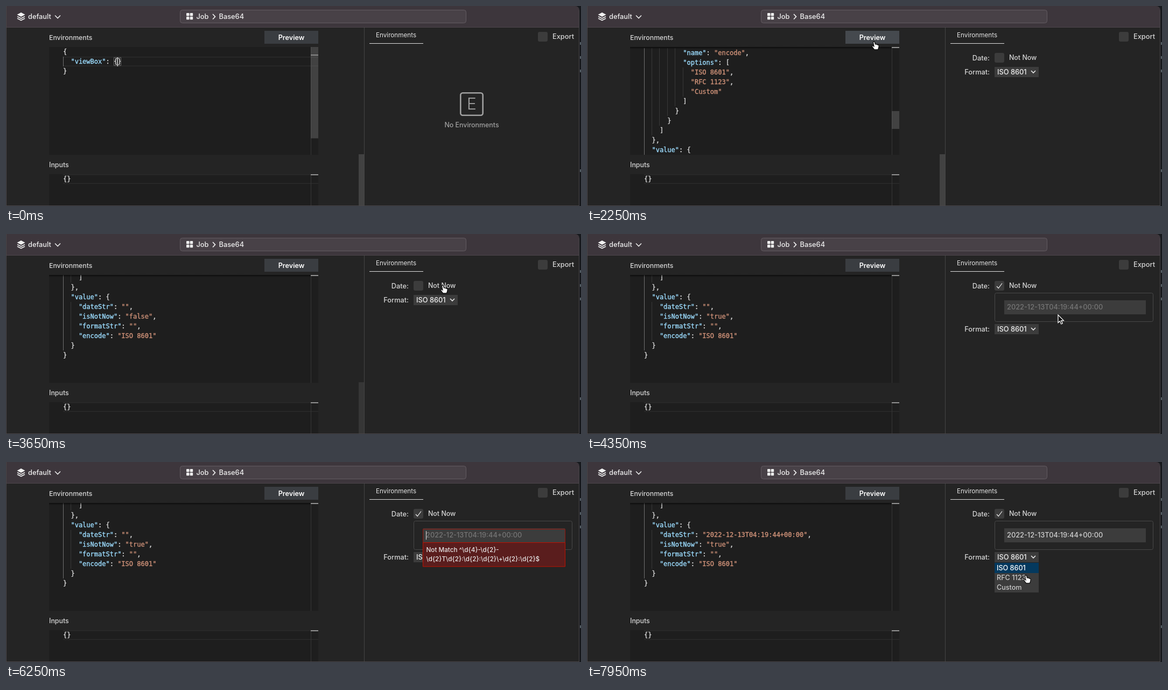
Write an HTML page with a canvas that moves like this. It is 1068 px wide and 371 px high and loops after 8 s.

```html
<!DOCTYPE html>
<html lang="en">
<head>
<meta charset="utf-8">
<title>Environment editor</title>
<style>
html, body { margin: 0; width: 100%; height: 100%; overflow: hidden; background: #242424 }
canvas { display: block }
</style>
</head>
<body>
<canvas id="stage" width="1068" height="371"></canvas>
<script>
const ctx = document.getElementById('stage').getContext('2d');
const LOOP = 8000, LINE = 18, CHAR = 7.224, TOP = 76, LEFT = 106;
const DATE = '2022-12-13T04:19:44+00:00';
const FORMATS = ['ISO 8601', 'RFC 1123', 'Custom'];
const FIRST_LINE = 40, LINE_COUNT = 57;
const PLAIN = '#dcdcdc', BRACKETS = ['#ffd700', '#da70d6', '#179fff'];

const during = (t, from, to) => t >= from && t < to;

// Eased interpolation through keys of the form [time, ...values].
function follow(keys, t) {
  const next = keys.findIndex(k => k[0] > t);
  if (next === 0) return keys[0].slice(1);
  if (next < 0) return keys[keys.length - 1].slice(1);
  const a = keys[next - 1], b = keys[next];
  const u = (t - a[0]) / (b[0] - a[0]), e = u * u * (3 - 2 * u);
  return a.slice(1).map((v, i) => v + (b[i + 1] - v) * e);
}

function rect(x, y, w, h, fill) {
  ctx.fillStyle = fill;
  ctx.fillRect(x, y, w, h);
}

function box(x, y, w, h, radius, fill, stroke, width = 1) {
  ctx.beginPath();
  ctx.roundRect(x, y, w, h, radius);
  if (fill) { ctx.fillStyle = fill; ctx.fill(); }
  if (stroke) { ctx.strokeStyle = stroke; ctx.lineWidth = width; ctx.stroke(); }
}

function line(points, color, width) {
  ctx.beginPath();
  points.forEach(([x, y]) => ctx.lineTo(x, y));
  ctx.strokeStyle = color;
  ctx.lineWidth = width;
  ctx.stroke();
}

function label(text, x, y, { size = 12.8, color = '#d6d6d6', weight = 500, align = 'left' } = {}) {
  ctx.font = `${weight} ${size}px Inter, sans-serif`;
  ctx.textAlign = align;
  ctx.textBaseline = 'middle';
  ctx.fillStyle = color;
  ctx.fillText(text, x, y);
}

function chevron(x, y, size, color = '#e8e8e8') {
  line([[x - size, y - size / 2], [x, y + size / 2], [x + size, y - size / 2]], color, 1.6);
}

function drawCode(text, y, bracketMode) {
  const indent = text.search(/\S/);
  ctx.font = '12px "DejaVu Sans Mono", monospace';
  ctx.textAlign = 'left';
  ctx.textBaseline = 'alphabetic';
  ctx.lineWidth = .35;
  for (const m of text.matchAll(/("[^"]*")(?=:)|"[^"]*"|[{}[\]]+|[^"{}[\]]+/g)) {
    const token = m[0];
    let color = PLAIN;
    if (bracketMode) {
      if (/^[{}[\]]/.test(token)) color = BRACKETS[indent / 2 % 3];
    } else if (m[1]) color = '#9cdcfe';
    else if (token[0] === '"') color = '#ce9178';
    ctx.fillStyle = ctx.strokeStyle = color;
    ctx.fillText(token, LEFT + m.index * CHAR, y + 13);
    ctx.strokeText(token, LEFT + m.index * CHAR, y + 13);
  }
}

function codeLines(t) {
  const date = t < 4900 ? '' : t < 5850 ? '2' : t < 6800 ? '' : DATE;
  return [
    '          "name": "encode",',
    '          "options": [',
    ...FORMATS.map((f, i) => `            "${f}"${i < 2 ? ',' : ''}`),
    '          ]', '        }', '      }', '    ]', '  },',
    '  "value": {',
    `    "dateStr": "${date}",`,
    `    "isNotNow": "${t >= 3950}",`,
    '    "formatStr": "",',
    '    "encode": "ISO 8601"',
    '  }', '}'
  ];
}

function currentLine(y) {
  rect(LEFT, y, 474, 1.5, '#2b2b2b');
  rect(LEFT, y + 16.5, 474, 1.5, '#2b2b2b');
}

function drawEditor(t, bracketMode) {
  const pasted = t >= 350;
  rect(80, TOP, 500, 200, '#1e1e1e');
  ctx.save();
  ctx.beginPath();
  ctx.rect(80, TOP, 500, 200);
  ctx.clip();
  const lines = pasted ? codeLines(t) : ['{', '  "viewBox": {}', '}'];
  const first = pasted ? FIRST_LINE : 0;
  const scroll = pasted ? follow([[400, 826], [1150, 718], [2350, 718], [2800, 868]], t)[0] : 0;
  if (!pasted) currentLine(94);
  lines.forEach((text, i) => {
    const y = TOP + (first + i) * LINE - scroll;
    for (let col = 0; col < text.search(/\S/); col += 2)
      rect(Math.floor(LEFT + col * CHAR), y, 1, LINE, col ? '#383838' : '#707070');
    drawCode(text, y, bracketMode);
  });
  if (!pasted) {
    box(200.5, 95.5, 6, 15, 0, null, '#666');
    box(207.5, 95.5, 6, 15, 0, null, '#666');
    rect(206.5, 95, 1.5, 17, '#c8c8c8');
  }
  if (scroll) {
    const shade = ctx.createLinearGradient(0, TOP, 0, TOP + 4);
    shade.addColorStop(0, '#0009');
    shade.addColorStop(1, '#0000');
    rect(80, TOP, 486, 4, shade);
  }
  rect(566, TOP, 1, 200, '#363636');
  rect(566, pasted ? TOP : 90, 14, 2, '#929292');
  if (t < 2900) {
    const total = (pasted ? LINE_COUNT : 3) * LINE + 182;
    rect(566, TOP + scroll * 200 / total, 14, 40000 / total, 'rgba(121,121,121,.4)');
  }
  ctx.restore();
}

function drawHeader() {
  rect(0, 0, 1065, 40, '#3d363c');
  rect(0, 39, 1065, 1, '#4c464b');
  ctx.fillStyle = '#f0f0f0';
  ctx.beginPath();
  [[28, 12], [35.5, 16], [28, 20], [20.5, 16]].forEach(p => ctx.lineTo(...p));
  ctx.fill();
  for (const y of [19.5, 23])
    line([[21, y], [28, y + 3.5], [35, y]], '#f0f0f0', 1.6);
  label('default', 41, 20, { color: '#eee' });
  chevron(96, 20, 5);
  box(323.5, 7.5, 531, 24, 4, '#484147', '#625b61');
  for (const x of [335, 341.7])
    for (const y of [13, 19.7]) box(x, y, 5.5, 5.5, 1, '#eee');
  label('Job', 353.5, 20, { color: '#eee' });
  line([[384, 15], [388.5, 19.8], [384, 24.5]], '#eee', 1.7);
  label('Base64', 395.5, 20, { color: '#eee' });
}

function checkbox(x, y, checked) {
  box(x, y, 18, 18, 3, '#3c3c3c');
  if (checked) line([[x + 4, y + 10], [x + 7.2, y + 13.5], [x + 14, y + 4.5]], '#f0f0f0', 1.2);
}

function drawForm(t) {
  const open = t >= 3950;
  const typed = during(t, 4900, 5400) ? '2' : t < 6800 ? '' : DATE;
  const failed = during(t, 4900, 6800);
  const right = { align: 'right' };
  label('Date:', 748, 97, right);
  checkbox(757, 87, open);
  label('Not Now', 784, 96, { size: 12.4 });

  const y = open ? 177 : 123;
  label('Format:', 748, y + .5, right);
  rect(757, y - 10, 82, 19, '#3c3c3c');
  label(FORMATS[0], 762, y, { color: '#f0f0f0' });
  chevron(829, y - 1, 4);
  if (!open) return;

  box(757.5, 109.5, 294, 53, 3, null, '#484848');
  rect(775, 123, 263, 26, '#3c3c3c');
  label(typed || DATE, 780, 136.5, { color: typed ? '#d0d0d0' : '#757575' });
  const blink = [[4700, 4900], [5400, 5850], [6250, 6550], [7300, 7750]];
  if (blink.some(([from, to]) => during(t, from, to)))
    rect(780 + (typed ? ctx.measureText(typed).width : 0), 128, 1, 16, '#ddd');
  if (failed) {
    box(774.5, 124.5, 264, 25, 0, null, '#96150c');
    box(774.5, 149.5, 264, 44.5, 0, '#5a1d1d', '#be1100');
    const message = { size: 11.7, color: '#e8e8e8' };
    label('Not Match ^\\d{4}-\\d{2}-', 780.5, 163, message);
    label('\\d{2}T\\d{2}:\\d{2}:\\d{2}\\+\\d{2}:\\d{2}$', 780.5, 180, message);
  }
  if (t >= 7750) {
    rect(757, 187, 82, 55, '#3c3c3c');
    rect(757, 187, 82, 19, '#04395e');
    FORMATS.forEach((f, i) => label(f, 761, 197 + i * 18, { size: 12.6, color: i ? '#ccc' : '#fff' }));
  }
}

function drawPreview(t) {
  rect(665, 40, 1, 331, '#444');
  label('Environments', 687, 54, { size: 11.7, color: '#e4e4e4', weight: 400 });
  rect(675, 69, 100, 1, '#e0e0e0');
  checkbox(988, 48, false);
  label('Export', 1015, 57);
  if (t >= 2200) return drawForm(t);
  box(844.3, 161.3, 41.4, 41.4, 4, null, '#a0a0a0', 2.6);
  label('E', 865, 183, { size: 30, color: '#a0a0a0', weight: 300, align: 'center' });
  label('No Environments', 865, 221, { size: 12.4, color: '#a0a0a0', align: 'center' });
}

const pointerPath = [
  [1250, 400, 240], [2000, 533, 66], [2300, 533, 66], [2600, 402, 190], [3150, 402, 190],
  [3650, 811, 95], [4100, 811, 95], [4350, 875, 150], [4900, 850, 139], [7200, 850, 139],
  [7550, 808, 175], [7750, 808, 175], [7950, 815, 210]
];
const arrow = new Path2D('M0 0V14.5L3.3 11.5L5.7 17L8.2 16L5.8 10.6H10.3Z');
const hand = new Path2D('M-1.5 1Q0-1 1.5 1L2.5 5Q4 4 5 5.5Q6.5 5 7.3 6.5Q9 6 9.3 8L8.5 12L7.3 15H.7L-3.5 9.5Q-4 7.5-1.8 8L0 9Z');
const beam = new Path2D('M-3.5-8Q0-8 0-5Q0-8 3.5-8M0-5V5M-3.5 8Q0 8 0 5Q0 8 3.5 8M-2 2H2');

function drawPointer(t) {
  if (!during(t, 1250, 5300) && t < 7200) return;
  const [x, y] = follow(pointerPath, t);
  const inside = (l, top, r, b) => x > l && x < r && y > top && y < b;
  ctx.save();
  ctx.translate(x, y);
  if (inside(80, 76, 580, 276) || t > 3950 && inside(775, 123, 1038, 149)) {
    ctx.strokeStyle = '#eee'; ctx.lineWidth = 3; ctx.stroke(beam);
    ctx.strokeStyle = '#111'; ctx.lineWidth = 1; ctx.stroke(beam);
  } else {
    const pointing = inside(480, 46, 580, 70) || inside(757, 87, 837, 105) || inside(757, 167, 839, 242);
    const shape = pointing ? hand : arrow;
    ctx.lineWidth = 1.3;
    ctx.fillStyle = pointing ? '#fff' : '#000';
    ctx.strokeStyle = pointing ? '#111' : '#fff';
    ctx.fill(shape);
    ctx.stroke(shape);
  }
  ctx.restore();
}

function draw(t) {
  const bracketMode = during(t, 5250, 5350) || during(t, 7150, 7250);
  rect(0, 0, 1068, 371, '#17191d');
  for (const y of [67, 93, 118, 303]) rect(1066, y, 2, 5, '#59636a');
  ctx.save();
  ctx.beginPath();
  ctx.roundRect(0, 0, 1065, 371, [0, 8, 0, 0]);
  ctx.clip();
  rect(0, 0, 1065, 371, '#242424');
  drawHeader();
  label('Environments', 80, 59, { size: 12.3 });
  rect(480, 46, 100, 24, during(t, 1950, 2350) ? '#45494e' : '#3a3d41');
  label('Preview', 530, 59, { size: 12.6, color: '#fff', weight: 600, align: 'center' });
  drawEditor(t, bracketMode);
  label('Inputs', 80, 295, { size: 12.4 });
  rect(80, 312, 500, 59, '#1e1e1e');
  currentLine(312);
  rect(566, 312, 1, 59, '#363636');
  rect(566, 312, 14, 2, '#929292');
  drawCode('{}', 312, bracketMode);
  // The page scrollbar fades once the pointer has left the pane.
  ctx.globalAlpha = follow([[3400, 1], [4000, 0]], t)[0];
  rect(655, 275, 10, 96, '#424242');
  ctx.globalAlpha = 1;
  drawPreview(t);
  rect(0, 0, 1, 371, '#484548');
  rect(1064, 8, 1, 363, '#484548');
  rect(0, 370, 1065, 1, '#484548');
  ctx.restore();
  drawPointer(t);
}

function frame() {
  draw(performance.now() % LOOP);
  requestAnimationFrame(frame);
}
frame();
</script>
</body>
</html>
```
